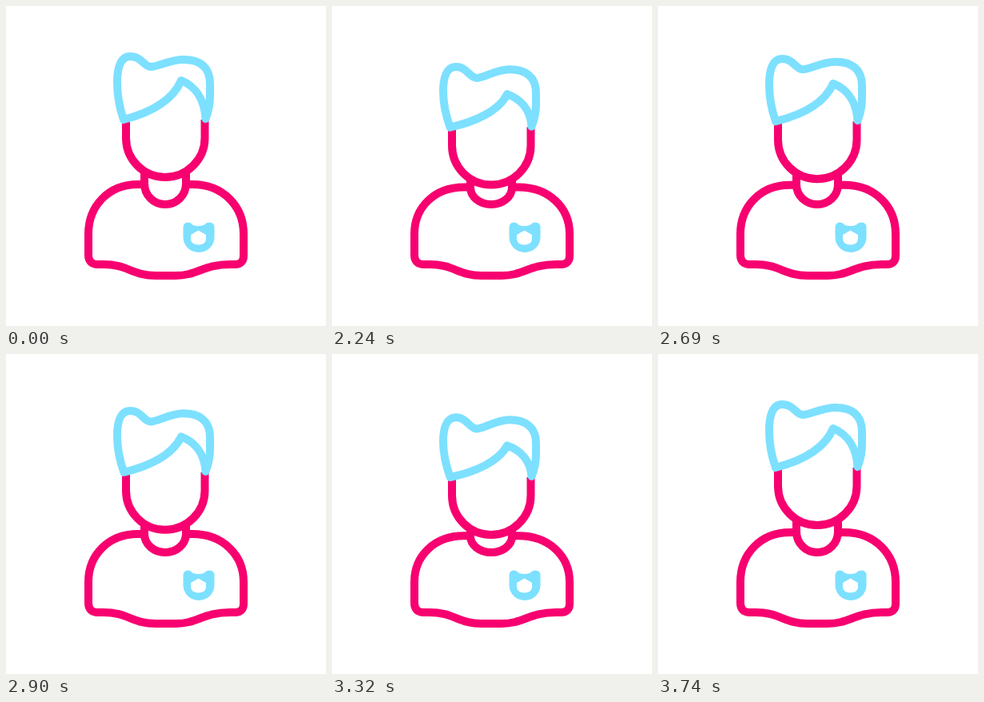
Animation, 400 px wide and 400 px high, one loop 3830 ms. Source, as an HTML page:

```html
<!DOCTYPE html>
<html lang="en">
<head>
<meta charset="utf-8">
<title>Person nodding</title>
<style>
html, body { margin: 0; height: 100%; overflow: hidden; background: #fff; }
svg { display: block; width: 100%; height: 100%; }
path { fill: none; stroke-width: 10; stroke-linejoin: round; stroke-linecap: round; }
.pink { stroke: #f70070; }
.blue { stroke: #7de0ff; }
#head { stroke-linecap: butt; }
#badge { fill: #7de0ff; fill-rule: evenodd; }
</style>
</head>
<body>
<svg viewBox="0 0 400 400">
  <path id="body" class="pink"/>
  <path id="neck" class="pink"/>
  <path id="head" class="pink"/>
  <path id="hair" class="blue"/>
  <path id="badge" d="M221.5 277Q221.5 271 227 270.5Q231 270.5 233 273.5Q240.5 276.5 248 273.5Q250 270.5 255 270.5Q261 271.5 260.5 277V289a19.5 19 0 0 1-39 0Z
    M240.5 280.5L250 286V292Q249 298 240.5 298.5Q232 298 231 292V286Z"/>
</svg>
<script>
const LOOP = 3830, START = 2030, STEP = 30;

// Each part: path with the head up, path with the head down
const poses = {
  body: [
    'M173 223H165C128 223 103 250 103 285V311Q103 323 115 323H122C152 323 158 337 187 337H212C240 337 246 323 280 323H286Q297 323 297 312V285C297 250 271 223 233 223H225',
    'M173 229H165C128 229 103 253 103 285V311Q103 323 115 323H122C152 323 158 337 187 337H212C240 337 246 323 280 323H286Q297 323 297 312V285C297 253 271 229 233 229H225'
  ],
  neck: [
    'M173 209V222C173 237 185 248 199 248C213 248 225 237 225 222V209',
    'M173 226V230C173 240 185 248 199 248C213 248 225 240 225 230V226'
  ],
  head: [
    'M150 142V165C150 192 172 214 199 214C226 214 248.5 192 248.5 165V142',
    'M150 158.5V181.5C150 208.5 172 230.5 199 230.5C226 230.5 248.5 208.5 248.5 181.5V158.5'
  ],
  hair: [
    'M147 142C142 128 139 113 139 95C139 78 143 63 155 63C170 63 172 76 181 76C190 76 205 67 222 67C242 67 255 76 255 97V112C255 122 254 130 249.5 141C248 116 236 100 219 93C208 119 178 134 147 142Z',
    'M148 158.5C143 145 139 131 139 115C139 99 143 85.5 155 85.5C168 85.5 172 100 181 100C190 100 205 88 222 88C242 88 255 97 255 117V130C255 140 254 147 249.5 157.5C248 140 236 128 219 122.5C208 141 178 153 148 158.5Z'
  ]
};

// Moments of full up (0) and full down (1)
const keys = [[2000, 0], [2433, 1], [2767, 0], [3100, 1], [3740, 0]];

function lowered(t) {
  if (t < START) return 0;
  t -= (t - START) % STEP;
  const i = keys.findIndex(([at]) => at > t);
  if (i < 0) return 0;
  const [t0, a] = keys[i - 1], [t1, b] = keys[i];
  const u = (t - t0) / (t1 - t0);
  return a + (b - a) * u * u * (3 - 2 * u);
}

function mix(from, to, p) {
  const ends = to.match(/[\d.]+/g);
  let i = 0;
  return from.replace(/[\d.]+/g, n => +n + (ends[i++] - n) * p);
}

const origin = performance.now();

function draw() {
  const p = lowered((performance.now() - origin) % LOOP);
  for (const id in poses)
    document.getElementById(id).setAttribute('d', mix(...poses[id], p));
  requestAnimationFrame(draw);
}
draw();
</script>
</body>
</html>
```
